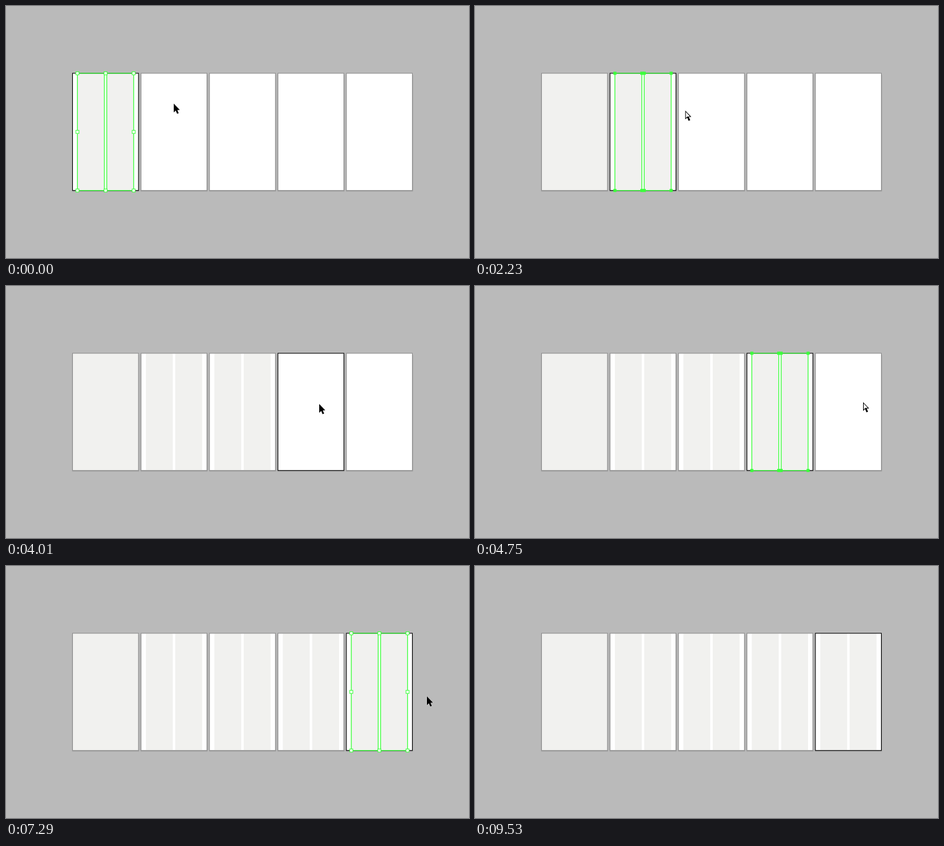
An HTML page with a canvas for the animation above (9800 ms loop, 748 by 408 pixels).

```html
<!DOCTYPE html>
<html>
<head>
<meta charset="utf-8">
<style>
html, body { margin: 0; height: 100%; overflow: hidden; background: #bababa; }
canvas { display: block; }
</style>
</head>
<body>
<canvas id="stage" width="748" height="408"></canvas>
<script>
const c = document.getElementById('stage').getContext('2d');
const LOOP = 9800, BEAT = 148.5;
const TOP = 108.9, BOTTOM = 298.7, HEIGHT = BOTTOM - TOP;
const PITCH = 110.6, BOARD = 106.6, COLUMN = 43.5, GAP = 3.9, MARGIN = 7.9;
const GREEN = '#3cff3c', PAPER = '#f1f1ef';

// Beats at which the pointer turns white, columns are pasted and the selection ends
const boards = [
  { white: 0, paste: -3, end: 1 },
  { white: 9, paste: 13, end: 18 },
  { white: 22, paste: 24, end: 27 },
  { white: 29, paste: 31, end: 36 },
  { white: 38, paste: 42, end: 54 }
];
boards.forEach((b, i) => {
  b.x = 107.5 + PITCH * i;
  b.columns = [0, 1].map(n => b.x + MARGIN + n * (COLUMN + GAP));
  b.handles = b.paste + 3;
});

// Pointer moves: first beat, last beat, end point
const moves = [
  [0, 0, 271, 158], [13, 16, 374, 175], [21, 23, 410, 180], [24, 27, 506, 191],
  [31, 32, 627, 188], [46, 49, 680, 211], [60, 64, 755, 455]
];

function fill(color, x, y, w, h) {
  c.fillStyle = color;
  c.fillRect(x, y, w, h);
}

function frame(color, x, y, w, h, line = 1.3) {
  c.strokeStyle = color;
  c.lineWidth = line;
  c.strokeRect(x, y, w, h);
}

function dot(x, y) {
  c.strokeStyle = c.fillStyle = GREEN;
  c.lineWidth = 1;
  c.beginPath();
  c.arc(x, y, 3.6, 0, 7);
  c.stroke();
  c.beginPath();
  c.arc(x, y, 1.4, 0, 7);
  c.fill();
}

function handle(x, y) {
  fill('#fff', x - 2.5, y - 2.5, 5, 5);
  frame(GREEN, x - 2.5, y - 2.5, 5, 5, 1);
}

function selection(b, beat) {
  for (const x of b.columns) {
    frame(GREEN, x, TOP, COLUMN, HEIGHT);
    if (beat >= b.handles) continue;
    for (const px of [x, x + COLUMN])
      for (const py of [TOP, BOTTOM]) fill(GREEN, px - 2.5, py - 2.5, 5, 5);
    if (beat == b.paste)
      for (const px of [14.3, 29.5])
        for (const py of [123.5, 284.5]) dot(x + px, py);
  }
  if (beat < b.handles) return;
  const w = 2 * COLUMN + GAP;
  for (const i of [0, 1, 2])
    for (const j of [0, 1, 2])
      if (i != 1 || j != 1) handle(b.columns[0] + w * i / 2, TOP + HEIGHT * j / 2);
}

function artboard(b, beat, active) {
  fill('#fff', b.x, TOP, BOARD, HEIGHT);
  if (b == boards[0] && beat >= b.end) fill(PAPER, b.x, TOP, BOARD, HEIGHT);
  else if (beat >= b.paste)
    for (const x of b.columns) fill(PAPER, x, TOP, COLUMN, HEIGHT);
  frame(active ? '#000' : '#8c8c8c', b.x, TOP, BOARD, HEIGHT, 1.1);
  if (beat >= b.paste && beat < b.end) selection(b, beat);
}

function pointer(beat) {
  let x = 271, y = 158;
  for (const [from, to, tx, ty] of moves) {
    if (beat < from) break;
    const k = to > from ? Math.min(1, (beat - from) / (to - from)) : 1;
    x += (tx - x) * k;
    y += (ty - y) * k;
  }
  c.save();
  c.translate(x, y);
  const arrow = new Path2D('M0 0V14.2L3.2 11.3 5.4 16.6 8 15.5 5.8 10.4 9.8 10.2Z');
  c.strokeStyle = 'rgba(255,255,255,.6)';
  c.lineWidth = 1;
  c.stroke(arrow);
  c.fillStyle = '#000';
  c.fill(arrow);
  c.fillStyle = '#fff';
  if (boards.some(b => beat >= b.white && beat < b.handles))
    c.fill(new Path2D('M1 2.2V12L3.4 9.6 7.5 9.3Z'));
  c.restore();
}

function draw(now) {
  const beat = Math.floor(now % LOOP / BEAT + .05);
  const active = boards[Math.min(4, boards.filter(b => beat >= b.end).length)];
  fill('#bababa', 0, 0, 748, 408);
  for (const b of boards) {
    fill('#b0b0b0', b.x - 1, 111, BOARD + 2, 190);
    fill('#a3a3a3', b.x, 112, BOARD + 1, 188);
  }
  for (const b of boards) if (b != active) artboard(b, beat, false);
  artboard(active, beat, true);
  pointer(beat);
}

const start = performance.now();
function tick() {
  draw(performance.now() - start);
  requestAnimationFrame(tick);
}
tick();
</script>
</body>
</html>
```
